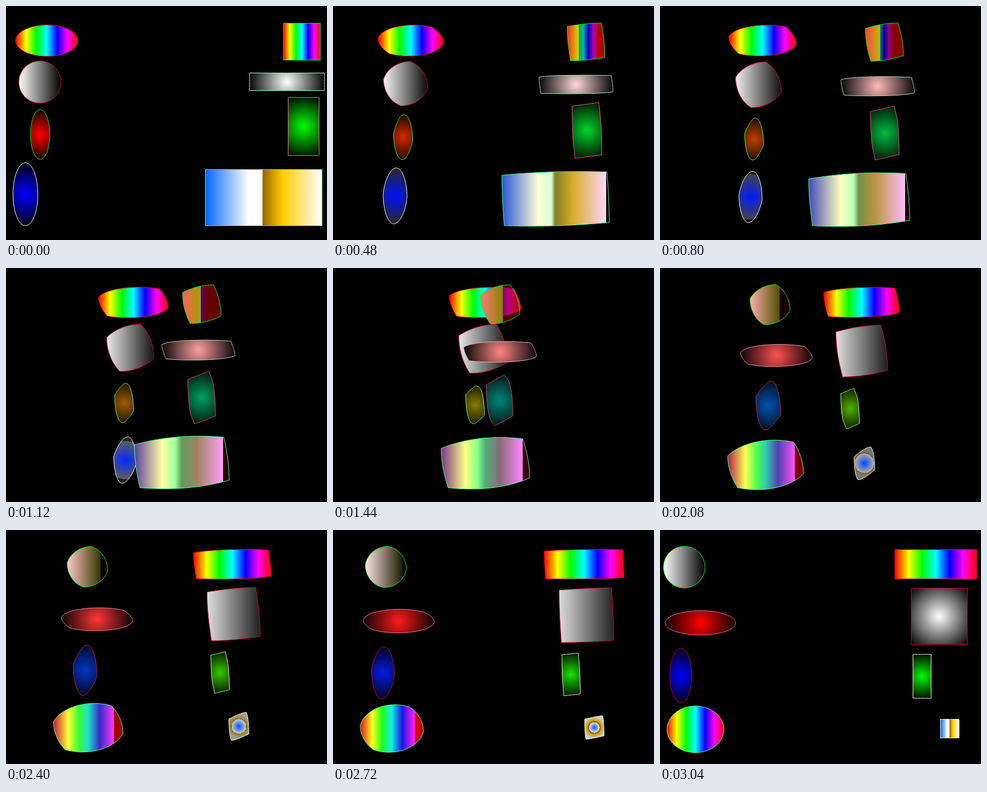
An HTML page with a canvas for the animation above (3.2 s loop, 550 by 400 pixels).

```html
<!DOCTYPE html>
<html lang="en">
<head>
<meta charset="utf-8">
<title>Shape morphs</title>
<style>
  html, body { margin: 0; width: 550px; height: 400px; overflow: hidden; background: #000; }
  canvas { display: block; }
</style>
</head>
<body>
<canvas width="550" height="400"></canvas>
<script>
const ctx = document.querySelector('canvas').getContext('2d');
const STEP = 160, STEPS = 20, SIDE_POINTS = 24, ARC_SAMPLES = 2000;

const lerp = (a, b, p) => a + (b - a) * p;
const mix = (a, b, p) => a.map((v, i) => lerp(v, b[i], p));
const rgb = hex => [...hex].map(d => parseInt(d, 16) * 17);
const rgba = ([r, g, b, a = 1]) => `rgba(${r},${g},${b},${a})`;

// Gradient stops are [offset, r, g, b, alpha].
const fill = (radial, ...stops) =>
  ({ radial, stops: stops.map(([offset, hex]) => [offset, ...rgb(hex), 1]) });
const glow = hex => fill(true, [0, hex], [1, '000']);
const grey = fill(false, [0, 'fff'], [1, '000']);
const rainbow = fill(false, ...['f00', 'ff0', '0f0', '0ff', '00f', 'f0f', 'f00'].map((c, i) => [i / 6, c]));
const chrome = fill(false, [0, '06f'], [.37, 'fff'], [.485, 'fff'], [.495, '960'], [.66, 'fc0'], [1, 'fff']);
const NO_STOP = [0, 0, 0, 0, 0];

const key = (box, fill, line) => ({ box, fill, line: rgb(line) });

function rectPoints([x0, y0, x1, y1]) {
  const corners = [[x0, y0], [x1, y0], [x1, y1], [x0, y1]];
  return corners.flatMap((c, i) =>
    Array.from({ length: SIDE_POINTS }, (_, k) => mix(c, corners[(i + 1) % 4], k / SIDE_POINTS)));
}

// Ellipse points, clockwise from the left, at the same share of the outline as the rectangle's points.
function ellipsePoints([x0, y0, x1, y1], [u0, v0, u1, v1]) {
  const point = i => {
    const angle = Math.PI * (1 + 2 * i / ARC_SAMPLES);
    return [(x0 + x1 + (x1 - x0) * Math.cos(angle)) / 2, (y0 + y1 + (y1 - y0) * Math.sin(angle)) / 2];
  };
  const lengths = [0];
  for (let i = 1; i <= ARC_SAMPLES; i++) {
    const [a, b] = [point(i - 1), point(i)];
    lengths.push(lengths[i - 1] + Math.hypot(b[0] - a[0], b[1] - a[1]));
  }
  const w = u1 - u0, h = v1 - v0, points = [];
  let walked = 0, i = 0;
  for (const side of [w, h, w, h]) {
    for (let k = 0; k < SIDE_POINTS; k++) {
      const share = (walked + side * k / SIDE_POINTS) / (2 * (w + h));
      while (lengths[i] < share * lengths[ARC_SAMPLES]) i++;
      points.push(point(i));
    }
    walked += side;
  }
  return points;
}

const toRect = (from, to) =>
  ({ from, to, start: ellipsePoints(from.box, to.box), end: rectPoints(to.box) });
const toEllipse = (from, to) =>
  ({ from, to, start: rectPoints(from.box), end: ellipsePoints(to.box, from.box) });

const shapes = [
  toRect(key([16.5, 32.5, 123, 86], rainbow, 'f03'), key([402.5, 33.5, 542.5, 83.5], rainbow, 'f03')),
  toRect(key([22, 94, 94, 166], grey, 'd03'), key([430.5, 99.5, 526.5, 195.5], glow('fff'), 'd03')),
  toRect(key([42, 177, 75, 262], glow('f00'), '0f0'), key([433.5, 212.5, 464.5, 287.5], glow('0f0'), 'ffc')),
  toRect(key([12, 268, 54.5, 375.5], glow('00f'), 'ffc'), key([480.5, 323.5, 512.5, 355.5], chrome, 'ffc')),
  toEllipse(key([475.5, 29.5, 538.5, 92.5], rainbow, '0f0'), key([6, 28, 77, 99], grey, '0f0')),
  toEllipse(key([417.5, 114.5, 545.5, 144.5], glow('fff'), '9fc'), key([9, 138, 129.5, 179.5], glow('f00'), 'f69')),
  toEllipse(key([483.5, 156.5, 536.5, 255.5], glow('0f0'), 'f69'), key([17, 202, 54.5, 295.5], glow('00f'), 'b03')),
  toEllipse(key([341.5, 279.5, 541.5, 375.5], chrome, '3f9'), key([12, 301, 109.5, 380.5], rainbow, '6f9')),
];

// Centre and reach of a gradient: half the width if linear, half the diagonal if radial.
function gradientFrame({ box: [x0, y0, x1, y1], fill }) {
  const w = x1 - x0, h = y1 - y0;
  return [(x0 + x1) / 2, (y0 + y1) / 2, (fill.radial ? Math.hypot(w, h) : w) / 2];
}

function gradient(from, to, p) {
  const [x, y, r] = mix(gradientFrame(from), gradientFrame(to), p);
  const { radial } = (p < 1 ? from : to).fill;
  const g = radial ? ctx.createRadialGradient(x, y, 0, x, y, r) : ctx.createLinearGradient(x - r, y, x + r, y);
  const a = from.fill.stops, b = to.fill.stops;
  let last = 0;
  for (let i = 0; i < Math.max(a.length, b.length); i++) {
    const [offset, ...color] = mix(a[i] || NO_STOP, b[i] || NO_STOP, p);
    last = Math.min(1, Math.max(last, offset));
    g.addColorStop(last, rgba(color));
  }
  return g;
}

function drawShape({ from, to, start, end }, p) {
  ctx.beginPath();
  start.forEach((point, i) => ctx.lineTo(...mix(point, end[i], p)));
  ctx.closePath();
  ctx.fillStyle = gradient(from, to, p);
  ctx.fill();
  ctx.strokeStyle = rgba(mix(from.line, to.line, p));
  ctx.stroke();
}

function draw() {
  const p = Math.floor(performance.now() / STEP) % STEPS / (STEPS - 1);
  ctx.clearRect(0, 0, 550, 400);
  shapes.forEach(shape => drawShape(shape, p));
  requestAnimationFrame(draw);
}
draw();
</script>
</body>
</html>
```
